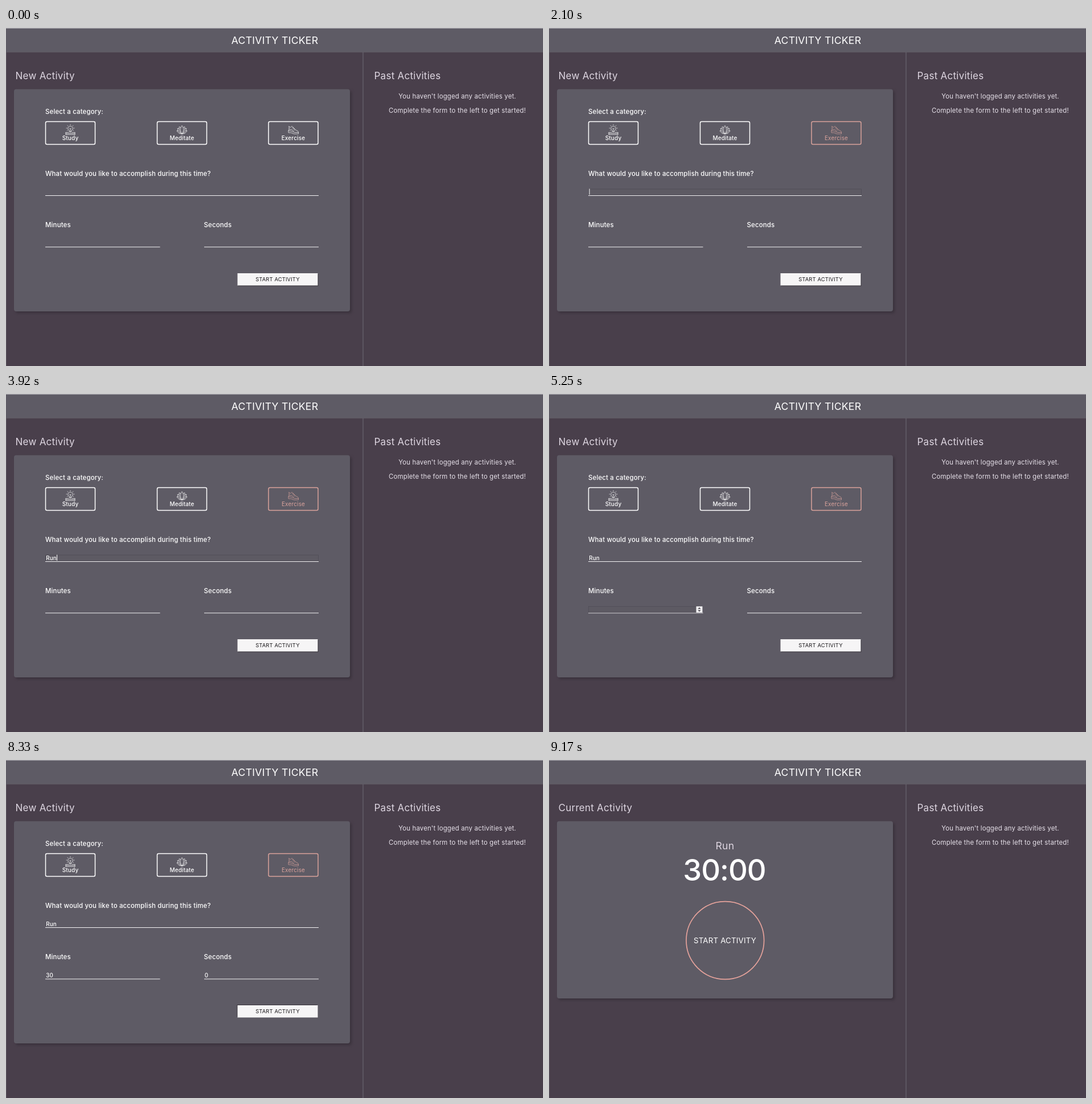
Animation of 943 by 594 pixels, one loop 9.24 s. Source, as an HTML page:

```html
<!DOCTYPE html>
<html lang="en">
<head>
<meta charset="utf-8">
<title>Activity form</title>
<style>
  html, body { margin: 0; width: 100%; height: 100%; overflow: hidden; background: #493f4b; }
  svg { display: block; width: 943px; height: 594px; }
  text { font: 500 11.4px Inter, "Open Sans", sans-serif; font-feature-settings: "calt" 0; letter-spacing: .015em; fill: #fff; }
  .mid { text-anchor: middle; }
  text.title { font-weight: 400; font-size: 17px; fill: #ddd5e0; }
  text.note { font-weight: 400; fill: #e6e0e9; }
  text.value { font-size: 9.8px; }
  text.hint { font-size: 9.1px; fill: #222; letter-spacing: 0; }
  .category { color: #fff; fill: none; stroke: currentColor; stroke-width: .7; stroke-linejoin: round; stroke-linecap: round; }
  .category rect { stroke-width: 1.5; }
  .category text { font-size: 10px; fill: currentColor; stroke: none; }
  .category.on { color: #d9a29b; }
  .category.on text { font-weight: 400; }
  .rule { stroke: #f4f3f5; }
  .focus { fill: #000; fill-opacity: .015; stroke: #4e4a54; stroke-width: .7; }
  .caret { fill: #fff; }
  .card { fill: #5e5b65; filter: drop-shadow(3px 3px 2px #3a323c); }
</style>
</head>
<body>
<svg viewBox="0 0 943 594">
  <defs>
    <g id="spinner">
      <rect width="11" height="11" fill="#f1f0f2"/>
      <path d="M2.8 4.6L5.5 1.8 8.2 4.6zM2.8 6.6L5.5 9.4 8.2 6.6z" fill="#4b4750"/>
    </g>
  </defs>

  <rect width="943" height="594" fill="#493f4b"/>
  <rect width="943" height="42" fill="#5e5b65"/>
  <path d="M0 .5H943" stroke="#a9a7ad"/>
  <path d="M0 42.5H943M.5 42V594" stroke="#625d68" stroke-width=".8"/>
  <path d="M627 42V594" stroke="#65606b" stroke-width="1.4"/>
  <text class="mid" x="472" y="28" style="font-size:17.6px;font-weight:400">ACTIVITY TICKER</text>
  <text class="title" x="646.5" y="89.5">Past Activities</text>
  <text class="note mid" x="792.5" y="124">You haven't logged any activities yet.</text>
  <text class="note mid" x="792.5" y="148.5">Complete the form to the left to get started!</text>

  <g id="form">
    <text class="title" x="16.5" y="89.5">New Activity</text>
    <rect class="card" x="14" y="107.5" width="590" height="390.5" rx="4"/>
    <text x="69" y="150.5">Select a category:</text>

    <g class="category" transform="translate(113 164)">
      <rect x="-43.5" y=".6" width="87" height="40" rx="2.5"/>
      <path d="M-2 17.5V16C-6 13-4 8.5 0 8.5S6 13 2 16V17.5ZM-1.5 19H1.5M0 17V13M-1.5 12L0 13.5 1.5 12
               M0 5.5V6.5M-5 7.5L-4 8.3M5 7.5L4 8.3M-7 12H-5.8M7 12H5.8M-5.5 16L-4.5 15.3M5.5 16L4.5 15.3
               M-8 19.5H-3M3 19.5H8M-8 21.5H8M-8 23.3H8M-8 19.5V23.3M8 19.5V23.3"/>
      <text class="mid" y="33">Study</text>
    </g>
    <g class="category" transform="translate(309 164)">
      <rect x="-43.5" y=".6" width="87" height="40" rx="2.5"/>
      <path d="M0 22C-3.5 17-3.5 12 0 7.5 3.5 12 3.5 17 0 22Z
               M-2.2 11L-4.8 9.5C-5.5 14-4 19 0 22 4 19 5.5 14 4.8 9.5L2.2 11
               M-5 13L-7.8 12.5C-7.5 17-4 21 0 22 4 21 7.500 17 7.800 12.500L5 13
               M-7 16.5H-9C-7 20.5-4 22 0 22 4 22 7 20.5 9 16.500H7"/>
      <text class="mid" y="33">Meditate</text>
    </g>
    <g class="category" id="exercise" transform="translate(504.5 164)">
      <rect x="-43.5" y=".6" width="87" height="40" rx="2.5"/>
      <path d="M-7.5 9C-6 11-4 11-2.5 8.5L3 14.5C5 16.5 8.5 15.5 9 19.5H2L-4 17-8.5 16.5C-7 14-7.5 12-7.5 9Z
               M-8.5 16.5V20H-4L1 22H9V19.5M-1.5 12L.3 10.8M.2 13.8L2 12.6M2 15.5L3.6 14.2M-7 14L-3 14.5 1 17.5"/>
      <text class="mid" y="33">Exercise</text>
    </g>

    <text x="69" y="259.7">What would you like to accomplish during this time?</text>
    <text x="69" y="349.5">Minutes</text>
    <text x="347.5" y="349.5">Seconds</text>
    <path class="rule" d="M69 294.5H549M69 384.9H270.5M348 384.9H549"/>
    <g id="fields"></g>

    <g id="hints">
      <rect x="69" y="296" width="132.5" height="61" rx="3" fill="#fff"/>
      <text class="hint" x="77.5" y="317.5">hey</text>
      <text class="hint" x="77.5" y="342.5">asdkjhlfjskla</text>
    </g>

    <rect id="shade" x="407.5" y="432" width="141" height="21.5" fill="#37323a"/>
    <rect x="406.5" y="431" width="141" height="21.5" fill="#f6f5f6"/>
    <text class="mid" x="477" y="444.7" style="font-size:9.4px;font-weight:400;fill:#1d1b1e">START ACTIVITY</text>
  </g>

  <g id="timer">
    <text class="title" x="16.5" y="89.5">Current Activity</text>
    <rect class="card" x="14" y="107.5" width="590" height="311.5" rx="4"/>
    <text class="title mid" x="309" y="156.5" style="font-size:17.6px">Run</text>
    <text class="mid" x="308" y="211.7" style="font-size:52.5px;letter-spacing:-.02em">30:00</text>
    <circle cx="309.3" cy="317" r="68.3" fill="none" stroke="#e5a29b" stroke-width="1.7"/>
    <text class="mid" x="309" y="321.7" style="font-size:13.3px;font-weight:400">START ACTIVITY</text>
  </g>
</svg>
<script>
const LOOP = 9240, PICK = 1120, PRESS = 8260, SWITCH = 8470;
const $ = id => document.getElementById(id);
const show = (node, on) => node.style.display = on ? "" : "none";
const within = (t, [from, to]) => t >= from && t < to;

// keys: [time, text typed so far]; spin: when the stepper is visible
const fields = [
  { x: 69.5, y: 283, w: 479, focus: [2100, 4340], keys: [[3220, "R"], [3430, "Ru"], [3640, "Run"]] },
  { x: 69.5, y: 373.5, w: 200, focus: [4340, 6230], keys: [[5320, "3"], [5460, "30"]], spin: [4340, 7420] },
  { x: 348, y: 373.5, w: 200, focus: [6230, PRESS], keys: [[7000, "0"]], spin: [6230, PRESS] }
];

for (const f of fields) {
  const g = document.createElementNS("http://www.w3.org/2000/svg", "g");
  g.innerHTML = `<rect class="focus" x="${f.x}" y="${f.y}" width="${f.w}" height="10.5"/>
    <text class="value" x="${f.x + .8}" y="${f.y + 8.7}"></text>
    <rect class="caret" y="${f.y - .5}" width="1" height="10.5"/>
    <use href="#spinner" x="${f.x + f.w - 11}" y="${f.y - .3}"/>`;
  $("fields").append(g);
  [f.box, f.text, f.caret, f.spinner] = g.children;
}

function drawField(f, t) {
  const [last, typed] = f.keys.filter(k => k[0] <= t).pop() || [f.focus[0], ""];
  const focused = within(t, f.focus);
  f.text.textContent = typed;
  show(f.box, focused);
  show(f.caret, focused && (t - last) % 1000 < 500);
  show(f.spinner, f.spin && within(t, f.spin));
  f.caret.setAttribute("x", f.x + 1 + (typed ? f.text.getComputedTextLength() : 0));
}

function draw() {
  const t = performance.now() % LOOP;
  show($("form"), t < SWITCH);
  show($("timer"), t >= SWITCH);
  $("exercise").classList.toggle("on", t >= PICK);
  show($("hints"), within(t, [2800, 3220]));
  const shift = t >= PRESS ? -2 : 0;
  $("shade").setAttribute("transform", `translate(${shift} ${shift})`);
  if (t < SWITCH) fields.forEach(f => drawField(f, t));
  requestAnimationFrame(draw);
}
draw();
</script>
</body>
</html>
```
